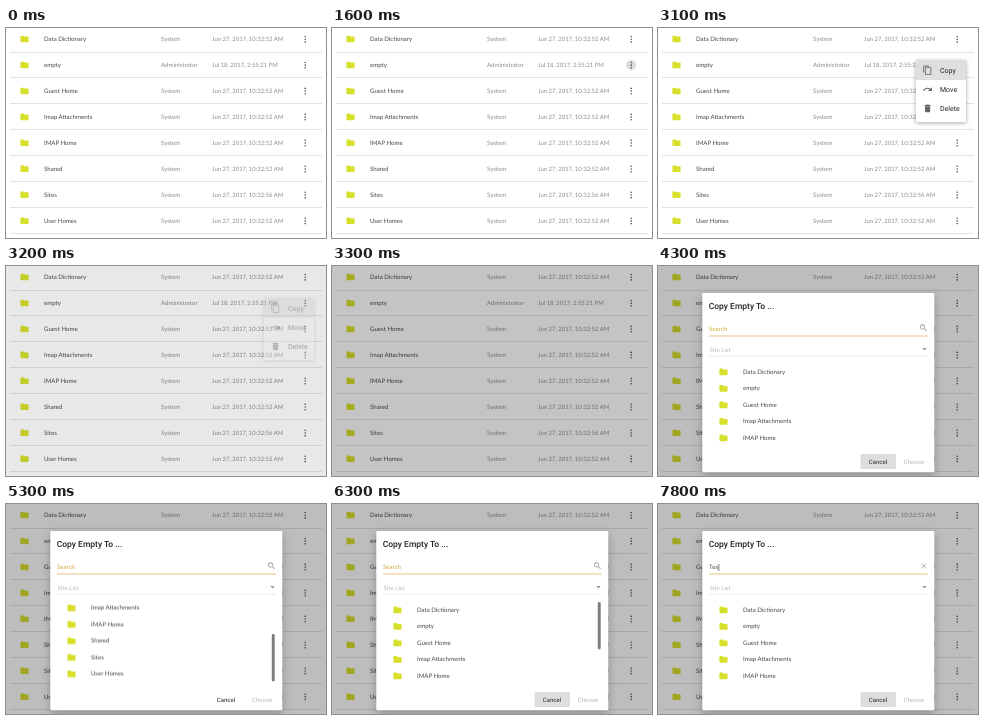
An HTML page for the animation above (8 s loop, 320x210 px).

```html
<!DOCTYPE html>
<html lang="en">
<head>
<meta charset="utf-8">
<title>Copy a folder</title>
<style>
html, body { margin: 0; width: 100%; height: 100%; overflow: hidden; background: #fff; }
svg { display: block; width: 320px; height: 210px; }
text { font: 6.1px Lato, sans-serif; fill: #484848; text-rendering: geometricPrecision; }
.meta { fill: #8c8c8c; }
.date { font-size: 5.93px; }
.rule { fill: #e3e3e3; shape-rendering: crispEdges; }
.folder { fill: #d7e02c; }
.dots { fill: #555; }
.ui { font-family: Roboto, sans-serif; }
.menu text { font-size: 7px; fill: #222; }
.menu path { fill: #666; }
.title { font-size: 8.5px; font-weight: 500; fill: #222; }
.button { font-size: 6px; font-weight: 500; text-anchor: middle; fill: #505050; }
.off { fill: #c6c6c6; }
.gold { fill: #d0aa3a; }
.icon { fill: #999; }
.shadow { filter: drop-shadow(0 1px 2px rgba(0, 0, 0, .35)); }
.deep { filter: drop-shadow(0 3px 4px rgba(0, 0, 0, .25)); }

.anim { animation: 8s linear infinite; }
.hard { animation-timing-function: step-end; }
.ripple { animation-name: ripple; transform-origin: 299px 37px; }
.menu { animation-name: menu; transform-origin: 307px 32px; }
.hover { animation-name: hover; }
.backdrop { animation-name: backdrop; }
.dialog { animation-name: dialog; transform-origin: 160px 116px; }
.cancel { animation-name: cancel; }
.list { animation-name: scroll; }
.thumb { animation-name: thumb; }
.caret { animation-name: caret; }
.empty { animation-name: empty; }
.key1 { animation-name: key1; }
.key2 { animation-name: key2; }
.key3 { animation-name: key3; }

@keyframes ripple {
  0%, 19.99% { opacity: 0; transform: scale(.5); }
  20% { opacity: 1; transform: scale(.5); }
  22.5% { opacity: .8; transform: scale(1); }
  25%, 100% { opacity: 0; transform: scale(1); }
}
@keyframes menu {
  0%, 20.5% { opacity: 0; transform: scale(.3); animation-timing-function: ease-out; }
  24%, 38.9% { opacity: 1; transform: none; }
  40.6%, 100% { opacity: 0; transform: none; }
}
@keyframes hover {
  0%, 29.5% { fill: #fff; }
  31.25%, 36% { fill: #efefef; }
  38.5%, 100% { fill: #dfdfdf; }
}
@keyframes backdrop {
  0%, 39.2% { opacity: 0; }
  41.25% { opacity: .23; }
  42.5%, 100% { opacity: .26; }
}
@keyframes dialog {
  0%, 41.6% { opacity: 0; transform: scale(.8); }
  43.5%, 100% { opacity: 1; transform: none; }
}
@keyframes cancel {
  0%, 53.74% { opacity: 0; }
  53.75%, 58.5% { opacity: 1; }
  61.25%, 75% { opacity: 0; }
  78.5%, 100% { opacity: 1; }
}
@keyframes scroll {
  0%, 64.4% { transform: none; }
  66.2%, 69% { transform: translateY(-51.5px); animation-timing-function: ease-in-out; }
  76.25%, 100% { transform: none; }
}
@keyframes thumb {
  0%, 64.4% { opacity: 0; transform: none; }
  65% { opacity: 1; }
  66.2%, 69% { opacity: 1; transform: translateY(32px); animation-timing-function: ease-in-out; }
  76.25%, 79.5% { opacity: 1; transform: none; }
  82.5%, 100% { opacity: 0; transform: none; }
}
@keyframes caret {
  0%, 53.75%, 66.25%, 78.75% { opacity: 0; transform: none; }
  47.5%, 60%, 72.5%, 85% { opacity: 1; transform: none; }
  91.25% { opacity: 1; transform: translateX(3.6px); }
  95% { opacity: 1; transform: translateX(6.6px); }
  97.5%, 100% { opacity: 1; transform: translateX(9.4px); }
}
@keyframes empty { 0% { opacity: 1; } 91.25%, 100% { opacity: 0; } }
@keyframes key1 { 0% { opacity: 0; } 91.25%, 100% { opacity: 1; } }
@keyframes key2 { 0% { opacity: 0; } 95%, 100% { opacity: 1; } }
@keyframes key3 { 0% { opacity: 0; } 97.5%, 100% { opacity: 1; } }
</style>
</head>
<body>
<svg viewBox="0 0 320 210">
  <defs>
    <path id="folder" d="M10 4H4c-1.1 0-1.99.9-1.99 2L2 18c0 1.1.9 2 2 2h16c1.1 0 2-.9 2-2V8c0-1.1-.9-2-2-2h-8l-2-2z"/>
    <clipPath id="view"><rect x="46" y="98" width="228" height="82"/></clipPath>
  </defs>
  <rect width="320" height="210" fill="#fff"/>
  <circle class="anim ripple" cx="299" cy="37" r="10" fill="#dcdcdc"/>
  <g id="rows"></g>

  <g class="anim menu">
    <rect class="shadow" x="258" y="32" width="50" height="62" rx="1" fill="#fff"/>
    <rect class="anim hover" x="258" y="32" width="50" height="20"/>
    <path transform="translate(264.3 37.1) scale(.43)" d="M16 1H4c-1.1 0-2 .9-2 2v14h2V3h12V1zm3 4H8c-1.1 0-2 .9-2 2v14c0 1.1.9 2 2 2h11c1.1 0 2-.9 2-2V7c0-1.1-.9-2-2-2zm0 16H8V7h11v14z"/>
    <path transform="translate(264.4 56.2) scale(.43)" d="M18.4 10.6C16.55 8.99 14.15 8 11.5 8c-4.65 0-8.58 3.03-9.96 7.22L3.9 16c1.05-3.19 4.05-5.5 7.6-5.5 1.95 0 3.73.72 5.12 1.88L13 16h9V7l-3.6 3.6z"/>
    <path transform="translate(264.4 75.3) scale(.43)" d="M6 19c0 1.1.9 2 2 2h8c1.1 0 2-.9 2-2V7H6v12zM19 4h-3.5l-1-1h-5l-1 1H5v2h14V4z"/>
    <text class="ui" x="282" y="44.5">Copy</text>
    <text class="ui" x="282" y="63.6">Move</text>
    <text class="ui" x="282" y="82.7">Delete</text>
  </g>

  <rect class="anim backdrop" width="320" height="210"/>

  <g class="anim dialog">
    <rect class="deep" x="44.3" y="27" width="232" height="179.3" rx="1" fill="#fff"/>
    <text class="ui title" x="50.7" y="42.8">Copy Empty To ...</text>

    <g class="anim hard empty">
      <text class="gold" x="51" y="65.2">Search</text>
      <path class="icon" transform="translate(260.9 57.2) scale(.39)" d="M15.5 14h-.79l-.28-.27C15.41 12.59 16 11.11 16 9.5 16 5.91 13.09 3 9.5 3S3 5.91 3 9.5 5.91 16 9.5 16c1.61 0 3.09-.59 4.23-1.57l.27.28v.79l5 4.99L20.49 19l-4.99-5zm-6 0C7.01 14 5 11.99 5 9.5S7.01 5 9.5 5 14 7.01 14 9.5 11.99 14 9.5 14z"/>
    </g>
    <g class="anim hard key1">
      <text x="51" y="65.2">T</text>
      <path d="M263.4 59.7l4.6 4.6m0-4.6l-4.6 4.6" stroke="#999" stroke-width=".8"/>
    </g>
    <text class="anim hard key2" x="54.2" y="65.2">e</text>
    <text class="anim hard key3" x="57.4" y="65.2">s</text>
    <rect class="anim hard caret" x="50.8" y="60" width=".8" height="7" fill="#444"/>
    <rect x="51" y="69.6" width="219" height=".8" fill="#e0b468"/>

    <text x="51.6" y="85.7" style="fill:#b8b8b8">Site List</text>
    <path class="icon" d="M264.2 82h4.6l-2.3 2.4z"/>
    <rect x="51" y="89.8" width="219" height=".8" fill="#e6e6e6"/>

    <g clip-path="url(#view)"><g id="list" class="anim list"></g></g>
    <rect class="anim thumb" x="265.8" y="98" width="2.9" height="47.5" rx="1.45" fill="#7c7c7c"/>

    <rect class="anim cancel" x="202.5" y="188" width="35.5" height="15" rx="1" fill="#dedede"/>
    <text class="ui button" x="220" y="197.7">Cancel</text>
    <text class="ui button off" x="256" y="197.7">Choose</text>
  </g>
</svg>
<script>
const names = ['Data Dictionary', 'empty', 'Guest Home', 'Imap Attachments',
  'IMAP Home', 'Shared', 'Sites', 'User Homes'];
const text = (x, y, s, cls = '') => `<text class="${cls}" x="${x}" y="${y + 2.2}">${s}</text>`;
const folder = (x, y) =>
  `<use href="#folder" class="folder" transform="translate(${x - 4.92} ${y - 4.92}) scale(.41)"/>`;
const dots = y => [-2.7, 0, 2.7].map(d =>
  `<circle class="dots" cx="299.2" cy="${y + d}" r=".8"/>`).join('');

const row = (name, i) => {
  const y = 10.6 + 25.96 * i;
  const owner = i === 1 ? 'Administrator' : 'System';
  const date = i === 1 ? 'Jul 18, 2017, 2:55:21 PM' : `Jun 27, 2017, 10:32:5${i === 6 ? 6 : 2} AM`;
  return folder(18.5, y + .4) + text(38, y, name) + text(155, y, owner, 'meta') +
    text(206, y, date, 'meta date') + dots(y + .6) +
    `<rect class="rule" x="4" y="${Math.round(23.5 + 25.95 * i)}" width="312" height="1"/>`;
};
const item = (name, i) => {
  const y = 105.5 + 16.5 * i;
  return folder(65.5, y + .4) + text(85, y, name);
};

document.getElementById('rows').innerHTML = names.map(row).join('');
document.getElementById('list').innerHTML = names.map(item).join('');
</script>
</body>
</html>
```
